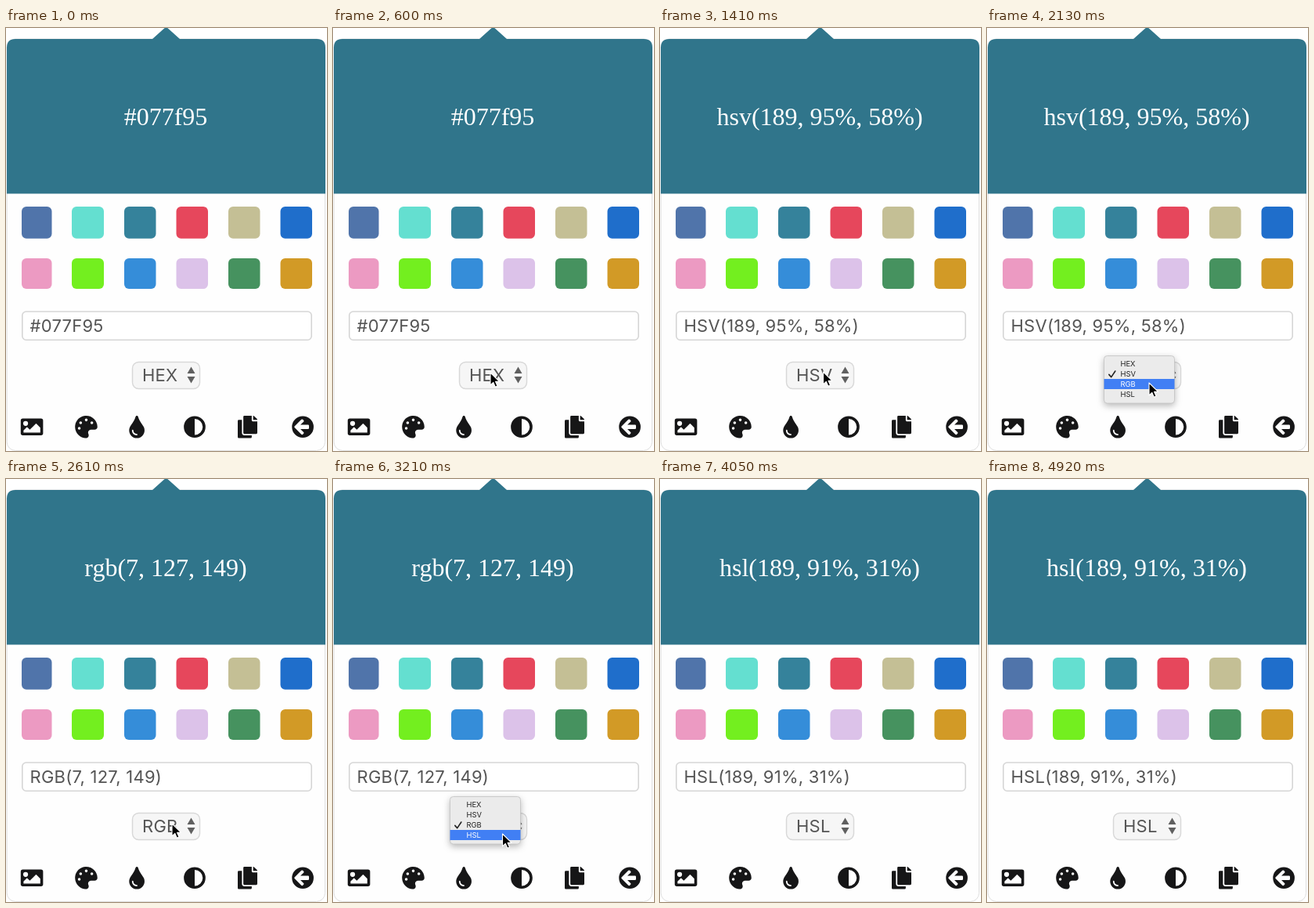
These frames come from a looping animation (410x540 px, 4.95 s). An HTML page:

```html
<!DOCTYPE html>
<html lang="en">
<head>
<meta charset="utf-8">
<title>Colour format picker</title>
<style>
  html, body { margin: 0; width: 100%; height: 100%; overflow: hidden; background: #fff; }
  svg { display: block; width: 410px; height: 540px; }
  .title { font: 32px "Liberation Serif", "Times New Roman", serif; fill: #fff; text-anchor: middle; }
  .field { font: 22px Inter, sans-serif; letter-spacing: .25px; fill: #555; }
  .item { font: 9.4px Inter, sans-serif; }
  .panel { filter: drop-shadow(0 3px 4px rgba(0, 0, 0, .28)); }
</style>
</head>
<body>
<svg viewBox="0 0 410 540" xmlns="http://www.w3.org/2000/svg">
  <rect x="1.2" y="14" width="406.3" height="525.5" rx="11" fill="#fefefe" stroke="#dedede"/>
  <path d="M1 211.5V25Q1 14 12 14H187L201.5 1Q204.5-2 207.5 1L222 14H397Q408 14 408 25V211.5Z" fill="#30758b"/>
  <text id="title" class="title" x="204" y="124"></text>
  <g id="swatches"></g>

  <rect x="20.8" y="362" width="369.4" height="36.2" rx="5" fill="#fff" stroke="#d6d6d6" stroke-width="1.6"/>
  <text id="value" class="field" x="30.5" y="387.5"></text>

  <rect x="161.5" y="426.5" width="86" height="34" rx="8" fill="#f6f6f6" stroke="#d8d8d8" stroke-width="1.4"/>
  <text id="choice" class="field" x="174" y="451.3"></text>
  <path d="M236.5 432.5L241.5 441H231.5ZM236.5 453.5L241.5 445H231.5Z" fill="#606060"/>

  <g id="icons" fill="#161617" fill-rule="evenodd"></g>

  <g id="menu">
    <rect class="panel" x="149.5" y=".5" width="90" height="60.5" rx="4" fill="#ebebeb" stroke="#c2c2c2" stroke-width=".8"/>
    <rect id="highlight" x="149.5" width="90" height="13" fill="#417ff4"/>
    <g id="items"></g>
    <path id="check" d="M155.8 .6L158.7 3.8L163.8-3.8" fill="none" stroke-width="1.6" stroke-linecap="round" stroke-linejoin="round"/>
  </g>

  <path id="cursor" d="M0 0V16L3.8 12.4L6.3 18.2L9 17L6.5 11.4H11.6Z" fill="#000" stroke="#fff" stroke-width="1.1" stroke-linejoin="round"/>
</svg>
<script>
const LOOP = 4950;
const FORMATS = [
  ['HEX', '#077f95'],
  ['HSV', 'hsv(189, 95%, 58%)'],
  ['RGB', 'rgb(7, 127, 149)'],
  ['HSL', 'hsl(189, 91%, 31%)']
];
// Each visit opens the menu and picks the next format on closing.
const VISITS = [[750, 1170], [1680, 2250], [2790, 3330]];
const FADE = 120;
const ROW = 13;

// [time, x, y] of the pointer tip
const TRACK = [
  [210, 412, 474], [540, 201, 440], [780, 201, 440], [1020, 206, 453], [1180, 206, 453],
  [1380, 208.5, 439], [1740, 208.5, 439], [1980, 207, 453], [2280, 207, 453],
  [2520, 212, 440], [2850, 212, 440], [3090, 216.5, 453], [3420, 216.5, 453], [3840, 414, 400]
];

const $ = id => document.getElementById(id);
const clamp = v => Math.max(0, Math.min(1, v));
const ease = v => v * v * (3 - 2 * v);

function add(parent, tag, attrs, text = '') {
  const node = document.createElementNS('http://www.w3.org/2000/svg', tag);
  for (const key in attrs) node.setAttribute(key, attrs[key]);
  node.textContent = text;
  return parent.appendChild(node);
}

const dot = (x, y, r) => `M${x - r} ${y}a${r} ${r} 0 1 0 ${2 * r} 0a${r} ${r} 0 1 0 ${-2 * r} 0Z`;

function buildSwatches() {
  const colors = [
    '#5074aa', '#64dfd0', '#35829b', '#e6475c', '#c4bf95', '#1f6ecb',
    '#ec9ac2', '#73ef1f', '#358dd9', '#dcc2e9', '#46925f', '#d29a26'
  ];
  const columns = [[20, 38.5], [84, 41], [151, 40.5], [217.5, 40.5], [284, 40.5], [350.5, 40.5]];
  colors.forEach((fill, i) => {
    const [x, width] = columns[i % 6];
    const low = i > 5;
    add($('swatches'), 'rect', { x, y: low ? 294 : 228, width, height: low ? 39 : 40.7, rx: 6, fill });
  });
}

function buildIcons() {
  const icons = [
    [18.8, 'M48 64H464Q512 64 512 112V400Q512 448 464 448H48Q0 448 0 400V112Q0 64 48 64Z' + dot(112, 176, 56) +
      'M64 384H448V272L360 184Q352 177 344 184L208 320L152 264Q144 257 136 264L64 336Z'],
    [88.2, 'M204 5C105 24 25 104 5 203C-32 390 137 530 264 510C305 504 325 456 306 418C283 373 316 320 367 320H447' +
      'C483 320 512 290 512 255C511 97 368-27 204 5Z' +
      dot(96, 288, 32) + dot(128, 160, 32) + dot(256, 96, 32) + dot(384, 160, 32)],
    [157.3, 'M205 22C197-7 156-8 147 22C100 180 0 223 0 334C0 432 79 512 176 512S352 432 352 334C352 222 252 181 205 22Z' +
      'M176 448C114 448 64 398 64 336C64 315 96 315 96 336C96 380 132 416 176 416C197 416 197 448 176 448Z'],
    [226.7, dot(256, 256, 248) + 'M256 440V72A184 184 0 0 1 256 440Z'],
    [296, 'M320 448V488Q320 512 296 512H24Q0 512 0 488V120Q0 96 24 96H96V392Q96 448 152 448Z' +
      'M320 104V0H152Q128 0 128 24V392Q128 416 152 416H424Q448 416 448 392V128H344Q320 128 320 104Z' +
      'M441 73L375 7Q368 0 358 0H352V96H448V90Q448 80 441 73Z'],
    [364.8, dot(256, 256, 248) +
      'M273 375L201 306H374Q398 306 398 282V230Q398 206 374 206H201L273 137Q290 120 273 103L257 87Q240 70 223 87' +
      'L71 239Q54 256 71 273L223 425Q240 442 257 425L273 409Q290 392 273 375Z']
  ];
  for (const [x, d] of icons) add($('icons'), 'path', { d, transform: `translate(${x} 495) scale(.0558)` });
}

function pointerAt(t) {
  const next = TRACK.findIndex(point => point[0] > t);
  if (next < 1) return null;
  const [t0, x0, y0] = TRACK[next - 1], [t1, x1, y1] = TRACK[next];
  const k = ease((t - t0) / (t1 - t0));
  return { x: x0 + (x1 - x0) * k, y: y0 + (y1 - y0) * k };
}

function drawMenu(t, pointer) {
  const index = VISITS.findIndex(([open, close]) => t >= open && t < close + FADE);
  $('menu').style.display = index < 0 ? 'none' : '';
  if (index < 0) return;

  const top = 431 - index * ROW;
  const row = t < VISITS[index][1] && pointer
    ? Math.max(0, Math.min(3, Math.floor((pointer.y - top - 4) / ROW)))
    : index + 1;
  $('menu').setAttribute('transform', `translate(0 ${top})`);
  $('menu').setAttribute('opacity', 1 - clamp((t - VISITS[index][1]) / FADE));
  $('highlight').setAttribute('y', 4 + row * ROW);
  $('check').setAttribute('transform', `translate(0 ${10.8 + index * ROW})`);
  $('check').setAttribute('stroke', row === index ? '#fff' : '#222');
  labels.forEach((label, i) => label.setAttribute('fill', i === row ? '#fff' : '#222'));
}

function draw(t) {
  const [name, text] = FORMATS[VISITS.filter(visit => t >= visit[1]).length];
  $('title').textContent = text;
  $('value').textContent = text.toUpperCase();
  $('choice').textContent = name;

  const pointer = pointerAt(t);
  drawMenu(t, pointer);
  $('cursor').style.display = pointer ? '' : 'none';
  if (pointer) $('cursor').setAttribute('transform', `translate(${pointer.x} ${pointer.y})`);
}

buildSwatches();
buildIcons();
const labels = FORMATS.map(([name], i) =>
  add($('items'), 'text', { class: 'item', x: 170.5, y: 14 + i * ROW }, name));

const start = performance.now();
function tick() {
  draw((performance.now() - start) % LOOP);
  requestAnimationFrame(tick);
}
tick();
</script>
</body>
</html>
```
